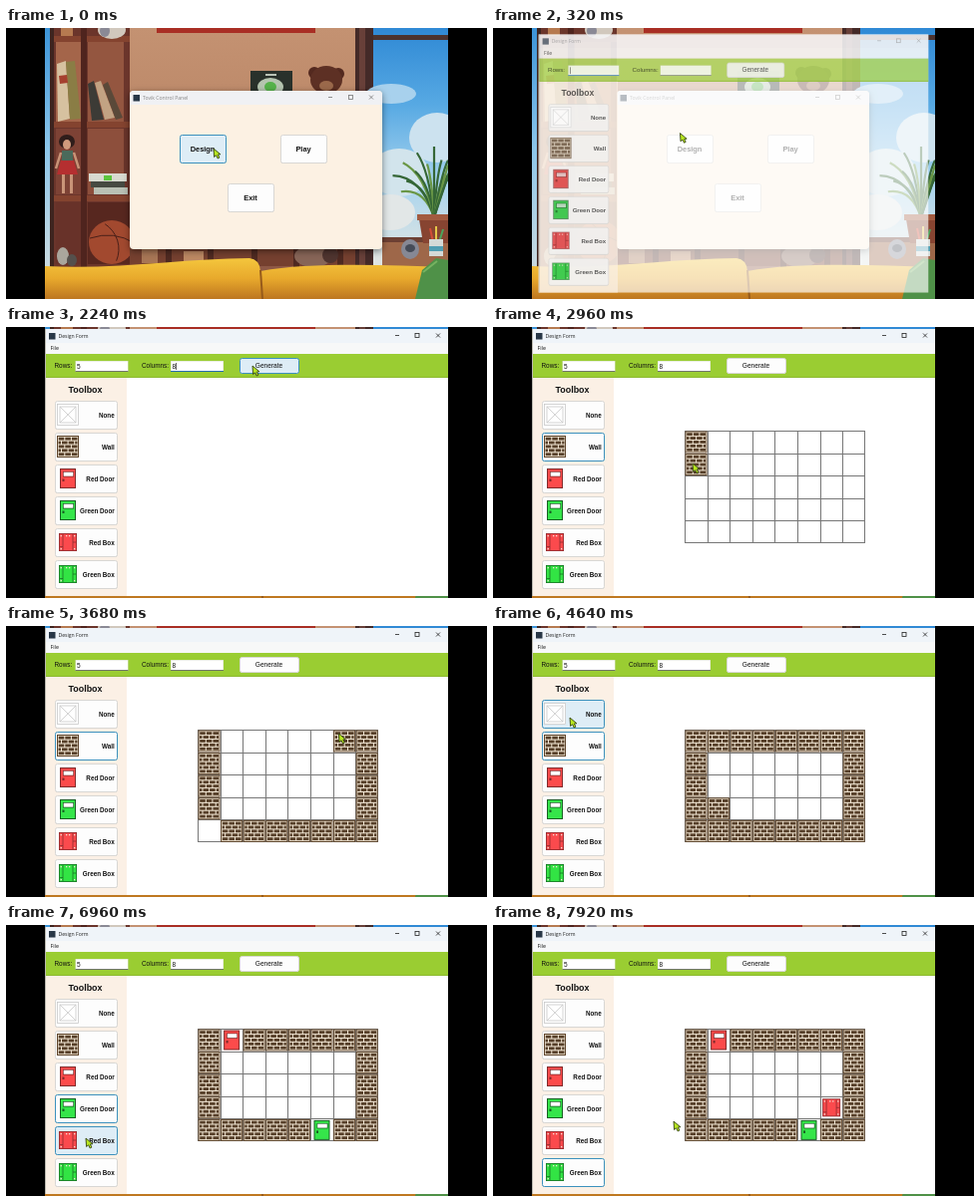
An HTML page with a canvas that plays this animation: 482 px wide and 272 px high, repeating every 8000 ms.

```html
<!DOCTYPE html>
<html lang="en">
<head>
<meta charset="utf-8">
<title>Design Form</title>
<style>
html, body { margin: 0; width: 100%; height: 100%; overflow: hidden; background: #000; }
canvas { display: block; width: 482px; height: 272px; }
</style>
</head>
<body>
<canvas id="stage" width="482" height="272"></canvas>
<script>
const ctx = document.getElementById('stage').getContext('2d');
const LOOP = 8000, STEP = 80, OPEN = 240;
const ARIAL = '"Liberation Sans", Arial, sans-serif';
const UI = '"Open Sans", "Noto Sans", sans-serif';

function rect(x, y, w, h, fill) {
  ctx.fillStyle = fill;
  ctx.fillRect(x, y, w, h);
}
function round(x, y, w, h, r, fill, stroke) {
  ctx.beginPath();
  ctx.roundRect(x, y, w, h, r);
  if (fill) { ctx.fillStyle = fill; ctx.fill(); }
  if (stroke) { ctx.strokeStyle = stroke; ctx.lineWidth = 1; ctx.stroke(); }
}
function oval(x, y, rx, ry, fill) {
  ctx.beginPath();
  ctx.ellipse(x, y, rx, ry, 0, 0, Math.PI * 2);
  ctx.fillStyle = fill;
  ctx.fill();
}
function poly(fill, ...p) {
  ctx.beginPath();
  for (let i = 0; i < p.length; i += 2) ctx.lineTo(p[i], p[i + 1]);
  ctx.closePath();
  ctx.fillStyle = fill;
  ctx.fill();
}
function line(color, width, ...p) {
  ctx.beginPath();
  for (let i = 0; i < p.length; i += 4) {
    ctx.moveTo(p[i], p[i + 1]);
    ctx.lineTo(p[i + 2], p[i + 3]);
  }
  ctx.strokeStyle = color;
  ctx.lineWidth = width;
  ctx.stroke();
}
function text(s, x, y, font, color = '#111', align = 'left') {
  ctx.font = font;
  ctx.fillStyle = color;
  ctx.textAlign = align;
  ctx.fillText(s, x, y);
}
function gradient(y0, y1, ...colors) {
  const g = ctx.createLinearGradient(0, y0, 0, y1);
  colors.forEach((c, i) => g.addColorStop(i / (colors.length - 1), c));
  return g;
}

// Desktop wallpaper
function room() {
  rect(39, 0, 404, 272, gradient(0, 240, '#c49272', '#b98565', '#8d5846'));
  rect(151, 0, 159, 5, '#a92e24');

  // shelf
  rect(46, 0, 78, 240, '#6b352b');
  rect(50, 12, 26, 82, '#a4654a');
  rect(82, 12, 36, 82, '#945640');
  rect(50, 101, 26, 66, '#7d4235');
  rect(82, 101, 36, 66, '#8d4f3c');
  rect(50, 175, 26, 62, '#683229');
  rect(82, 175, 46, 62, '#57271f');
  for (const y of [8, 94, 168]) rect(46, y, 78, 6, '#84432f');
  rect(75, 0, 6, 240, '#4f241e');
  rect(39, 0, 6, 240, gradient(0, 240, '#3c94d8', '#8cc6ea', '#c9dae0'));
  rect(44, 0, 4, 240, '#3e241f');

  rect(55, 0, 12, 8, '#b67a50');
  oval(106, 2, 14, 9, '#d1c8bd');
  oval(99, 3, 5, 6, '#8a8995');
  poly('#d6c1a0', 51, 36, 60, 33, 64, 91, 52, 94);
  poly('#8a7d45', 60, 34, 69, 33, 75, 91, 64, 92);
  poly('#a5402f', 53, 48, 61, 47, 62, 55, 54, 56);
  poly('#3c3b36', 82, 56, 88, 53, 98, 92, 86, 93);
  poly('#c2a383', 89, 55, 95, 53, 109, 90, 99, 92);
  poly('#5a4939', 97, 57, 102, 54, 117, 90, 110, 92);

  // doll
  oval(61, 114, 8, 7, '#2f1d1b');
  oval(61, 117, 4, 5, '#cf9a7c');
  rect(56, 123, 11, 12, '#4a6a5b');
  poly('#b52f30', 55, 133, 68, 133, 72, 147, 51, 147);
  rect(56, 147, 3, 19, '#c99478');
  rect(64, 147, 3, 19, '#c99478');
  line('#c99478', 2.5, 55, 125, 50, 141, 68, 125, 73, 141);

  rect(83, 146, 38, 8, '#d8dad0');
  rect(85, 154, 34, 6, '#464a42');
  rect(88, 160, 34, 7, '#b9c0b4');
  rect(98, 148, 8, 5, '#5cc53e');

  oval(106, 215, 23, 22, '#a2492f');
  ctx.beginPath();
  ctx.arc(83, 222, 30, -1, 0.4);
  ctx.moveTo(84, 211);
  ctx.quadraticCurveTo(108, 203, 129, 216);
  ctx.strokeStyle = '#4a2019';
  ctx.lineWidth = 1;
  ctx.stroke();
  oval(57, 229, 6, 9, '#aaa69c');
  oval(66, 233, 5, 6, '#55504c');

  // middle items
  rect(124, 219, 230, 20, '#75402f');
  for (const x of [160, 202, 246, 288, 332]) rect(x, 210, 6, 30, '#4e2921');
  rect(136, 222, 16, 14, '#a87655');
  rect(178, 224, 20, 12, '#bc8863');
  oval(308, 229, 19, 11, '#876557');
  oval(325, 228, 8, 8, '#4f342f');
  rect(245, 43, 42, 24, '#29312b');
  oval(265, 59, 13, 9, '#b5c5b0');
  oval(265, 59, 6, 5, '#55b24a');
  rect(260, 46, 11, 2, '#b9c2b6');
  oval(309, 45, 6, 6, '#53291f');
  oval(333, 46, 6, 6, '#53291f');
  oval(321, 52, 16, 14, '#5d3024');
  oval(321, 58, 7, 5, '#9b694b');

  // window
  rect(350, 0, 93, 240, '#442a28');
  rect(368, 0, 75, 240, gradient(0, 230, '#2f89d5', '#57a9e3', '#a6d3ee', '#dfe5e3'));
  rect(354, 0, 6, 240, '#684039');
  rect(368, 7, 75, 5, '#4c332f');
  oval(386, 66, 25, 10, '#a8d1ed');
  oval(432, 110, 28, 25, '#cce2ef');
  oval(394, 145, 29, 24, '#d2e4ec');
  oval(385, 185, 25, 18, '#e2e7e7');
  rect(377, 214, 66, 26, '#9e6749');
  rect(368, 210, 75, 5, '#6d4033');

  // plant
  for (let i = 0; i < 15; i++) {
    const a = -Math.PI / 2 + (i - 7) * 0.13;
    const len = 42 + (i * 17) % 30;
    ctx.beginPath();
    ctx.moveTo(429, 190);
    ctx.quadraticCurveTo(429 + Math.cos(a) * len * 0.3, 190 - len * 0.7,
      Math.min(443, 429 + Math.cos(a) * len), 190 + Math.sin(a) * len);
    ctx.strokeStyle = i % 3 ? '#356636' : '#6a9746';
    ctx.lineWidth = 2.2;
    ctx.stroke();
  }
  poly('#874431', 414, 192, 443, 192, 443, 216, 418, 216);
  rect(412, 187, 31, 6, '#a25b40');
  oval(405, 222, 9, 10, '#868895');
  oval(405, 221, 5, 4, '#454b58');
  line('#d34c36', 2, 428, 215, 425, 201);
  line('#e5c748', 2, 431, 215, 431, 199);
  line('#4ca45c', 2, 434, 215, 438, 202);
  rect(424, 212, 14, 17, '#d5dad7');
  rect(424, 219, 14, 5, '#519eb2');

  // sofa
  ctx.beginPath();
  ctx.moveTo(39, 239);
  ctx.bezierCurveTo(110, 243, 180, 231, 244, 231);
  ctx.quadraticCurveTo(254, 232, 255, 244);
  ctx.bezierCurveTo(305, 235, 380, 238, 443, 240);
  ctx.lineTo(443, 272);
  ctx.lineTo(39, 272);
  ctx.fillStyle = gradient(231, 272, '#f4c63d', '#e8a92c', '#bd7620');
  ctx.fill();
  line('#965a1b', 2, 255, 243, 257, 272);
  poly('#4f9148', 410, 272, 417, 243, 431, 231, 443, 233, 443, 272);
  line('#76b361', 2, 418, 245, 432, 234);
}

function caption(x, y, title, color) {
  rect(x, y - 3, 6.5, 6.5, '#283747');
  text(title, x + 9.5, y + 2, '5.1px ' + UI, color);
}
function windowButtons(xs, y, color) {
  const [a, b, c] = xs;
  line(color, 0.8, a - 2, y, a + 2, y, c - 2, y - 2, c + 2, y + 2, c - 2, y + 2, c + 2, y - 2);
  ctx.strokeRect(b - 2, y - 2, 4, 4);
}
function button(x, y, w, h, hot, focus) {
  round(x + 0.5, y + 1, w - 1, h - 1, 2, '#d2cfca');
  round(x + 0.5, y + 0.5, w - 1, h - 1, 2, hot ? '#deedf6' : '#fdfdfd',
    hot || focus ? '#3c91bd' : '#d8d7d4');
}
function inside(p, x, y, w, h) {
  return p.x >= x && p.x < x + w && p.y >= y && p.y < y + h;
}

function controlPanel(p) {
  ctx.save();
  ctx.shadowColor = 'rgba(0,0,0,.45)';
  ctx.shadowBlur = 7;
  ctx.shadowOffsetY = 2;
  round(124, 63, 253, 159, 4, '#fcf1e3');
  ctx.restore();
  round(124, 63, 253, 14, [4, 4, 0, 0], '#f0f1f4');
  caption(127.5, 70, 'Tovik Control Panel', '#858585');
  windowButtons([325, 345.5, 366], 69.5, '#777');
  for (const [label, x, y] of [['Design', 174, 107], ['Play', 275, 107], ['Exit', 222, 156]]) {
    button(x, y, 47, 29, inside(p, x, y, 47, 29));
    text(label, x + 23, y + 17, 'bold 7.4px ' + ARIAL, '#111', 'center');
  }
}

// Tile pictures, each in a 22 px square
function wall(x, y) {
  rect(x, y, 22, 22, '#60462c');
  rect(x + 1, y + 1, 20, 20, '#f5ead8');
  for (let r = 0; r < 5; r++) {
    for (let k = -1; k < 4; k++) {
      const a = Math.max(1.5, k * 6.6 + (r % 2 ? 5 : 1.7));
      const b = Math.min(20.5, k * 6.6 + (r % 2 ? 10.6 : 7.3));
      if (b > a) rect(x + a, y + 1.7 + r * 3.9, b - a, 2.9, '#57402a');
    }
  }
}
function door(x, y, fill, dark) {
  rect(x + 3, y + 1, 16, 20, dark);
  rect(x + 4, y + 2, 14, 18, fill);
  rect(x + 6, y + 4, 11, 5.5, dark);
  rect(x + 6.7, y + 4.7, 9.6, 4, '#fff');
  rect(x + 5.5, y + 11.5, 2, 2.5, dark);
}
function box(x, y, fill, dark) {
  rect(x + 2, y + 2, 18, 18, dark);
  rect(x + 2.8, y + 2.8, 16.4, 16.4, fill);
  line(dark, 0.8, x + 6, y + 3, x + 6, y + 19, x + 16, y + 3, x + 16, y + 19,
    x + 3, y + 15.5, x + 6, y + 15.5, x + 16, y + 11, x + 19, y + 11);
  for (const [a, b] of [[3.6, 4], [17, 4], [17, 17], [3.6, 17], [9, 4], [12, 4]])
    rect(x + a, y + b, 1.3, 1.3, '#f3dfd5');
}
function none(x, y) {
  rect(x, y, 22, 22, '#fff');
  line('#c9c9c9', 0.8, x + 3, y + 3, x + 19, y + 19, x + 19, y + 3, x + 3, y + 19);
  ctx.strokeRect(x + 0.5, y + 0.5, 21, 21);
  ctx.strokeRect(x + 3, y + 3, 16, 16);
}
const TOOLS = [
  ['None', none],
  ['Wall', wall],
  ['Red Door', (x, y) => door(x, y, '#fc4b4b', '#812b2b')],
  ['Green Door', (x, y) => door(x, y, '#35e54a', '#175f22')],
  ['Red Box', (x, y) => box(x, y, '#fb4a4d', '#8c2b2e')],
  ['Green Box', (x, y) => box(x, y, '#32e444', '#187025')]
];

const GRID = { x: 192, y: 104, size: 22.6, cols: 8, rows: 5 };
const cellSpot = (c, r) => [GRID.x + c * GRID.size + 8, GRID.y + r * GRID.size + 4];

// Edits on the board: [time, column, row, tool]
const edits = [];
const stroke = (c, r) => edits.push([2890 + edits.length * 52, c, r, 1]);
for (let r = 0; r < 4; r++) stroke(0, r);
for (let c = 1; c < 8; c++) stroke(c, 4);
for (let r = 3; r >= 0; r--) stroke(7, r);
for (let c = 6; c > 0; c--) stroke(c, 0);
edits.push([4060, 0, 4, 1], [4200, 1, 3, 1], [5040, 1, 3, 0],
  [5640, 1, 0, 2], [6640, 5, 4, 3], [7320, 6, 3, 4]);

// Tool clicks: [time, tool]
const picks = [[2700, 1], [4700, 0], [5360, 2], [6290, 3], [7000, 4], [7680, 5]];

const path = [
  [0, 208, 121], [240, 208, 121], [520, 95, 38], [1150, 95, 38], [1400, 190, 38],
  [1900, 200, 38], [2200, 247, 39], [2360, 247, 39], [2640, 80, 118], [2720, 80, 118],
  ...edits.map(([t, c, r]) => [t, ...cellSpot(c, r)]),
  [4600, 77, 92], [4740, 77, 92], [5330, 80, 150], [5400, 80, 150],
  [5980, 75, 248], [6030, 75, 248], [6240, 80, 182], [6320, 80, 182],
  [6960, 80, 214], [7040, 80, 214], [7620, 78, 246], [7700, 78, 246],
  [7920, 181, 197], [8000, 183, 195]
].sort((a, b) => a[0] - b[0]);

function pointer(t) {
  const i = Math.max(1, path.findIndex(k => k[0] > t));
  const [t0, x0, y0] = path[i - 1], [t1, x1, y1] = path[i];
  const u = (t - t0) / (t1 - t0), e = u * u * (3 - 2 * u);
  return { x: x0 + (x1 - x0) * e, y: y0 + (y1 - y0) * e };
}

function field(x, value, focus) {
  rect(x, 34, 53, 11, '#d8dfc8');
  rect(x + 0.5, 34.5, 52, 10, '#fff');
  rect(x, 44, 53, 1, focus ? '#256bb5' : '#71766a');
  text(value, x + 1.5, 41.7, '6.5px ' + ARIAL);
  if (focus) rect(x + (value ? 5.2 : 2), 36, 0.7, 7, '#222');
}

function board(t) {
  const { x, y, size, cols, rows } = GRID;
  rect(x, y, cols * size, rows * size, '#fff');
  for (let c = 0; c <= cols; c++)
    rect(Math.round(x + c * size) - (c === cols ? 1 : 0), y, 1, rows * size, '#777');
  for (let r = 0; r <= rows; r++)
    rect(x, Math.round(y + r * size) - (r === rows ? 1 : 0), cols * size, 1, '#777');
  const cells = new Map();
  for (const [at, c, r, tool] of edits) if (at <= t) cells.set(c + r * cols, tool);
  for (const [i, tool] of cells) {
    if (!tool) continue;
    const px = x + (i % cols) * size, py = y + Math.floor(i / cols) * size;
    TOOLS[tool][1](px + 0.5, py + 0.5);
  }
}

function designForm(t, p) {
  const ready = t >= 640;
  rect(39, 2, 404, 268, '#fff');
  rect(39, 2, 404, 14, ready ? '#eff4f9' : '#f3f3f5');
  caption(43, 9, 'Design Form', ready ? '#222' : '#888');
  windowButtons([392, 412, 433], 8.5, ready ? '#222' : '#999');
  rect(39, 16, 404, 11, '#f7f8f8');
  text('File', 44.5, 23, '5.3px ' + UI);

  rect(39, 27, 404, 24, '#9acd32');
  rect(39, 50, 404, 1, '#8cb92f');
  text('Rows:', 48.5, 41.2, '6.4px ' + ARIAL);
  field(69.5, t >= 1000 ? '5' : '', t < 1400);
  text('Columns:', 136, 41.2, '6.4px ' + ARIAL);
  field(165, t >= 1680 ? '8' : '', t >= 1400 && t < 2360);
  button(234, 31, 60, 16, inside(p, 234, 31, 60, 16), t >= 2360 && t < 2700);
  text('Generate', 263.5, 41.3, '6.6px ' + ARIAL, '#111', 'center');

  rect(39, 51, 82, 219, '#fbf0e5');
  text('Toolbox', 79.5, 66, 'bold 8.9px ' + ARIAL, '#111', 'center');
  const pick = picks.filter(k => k[0] <= t).pop();
  TOOLS.forEach(([label, draw], i) => {
    const y = Math.round(73.5 + i * 32.1);
    button(49, y, 63, 29, inside(p, 49, y, 63, 29), pick && pick[1] === i);
    draw(51, y + 3);
    text(label, 108.7, y + 16.8, 'bold 6.3px ' + ARIAL, '#111', 'right');
  });

  if (t >= 2360) board(t);
  rect(39, 2, 1, 268, '#b9b7ad');
}

function cursor({ x, y }) {
  ctx.save();
  ctx.translate(x, y);
  ctx.lineJoin = 'round';
  poly('#b7e51f', 0, 0, 0.6, 8.5, 2.6, 6.8, 4.2, 10, 5.9, 9.1, 4.4, 6, 6.9, 5.8);
  ctx.strokeStyle = '#344313';
  ctx.lineWidth = 0.9;
  ctx.stroke();
  ctx.restore();
}

function draw(t) {
  const p = pointer(t);
  rect(0, 0, 482, 272, '#000');
  ctx.save();
  ctx.beginPath();
  ctx.rect(39, 0, 404, 272);
  ctx.clip();
  room();
  if (t < OPEN + 160) controlPanel(p);
  if (t >= OPEN) {
    const u = Math.min(1, (t - OPEN + STEP) / 240), s = 0.9 + 0.1 * u;
    ctx.globalAlpha = u;
    ctx.translate(241, 136);
    ctx.scale(s, s);
    ctx.translate(-241, -136);
    designForm(t, p);
    ctx.globalAlpha = 1;
  }
  const typing = t >= OPEN && (inside(p, 69, 34, 54, 11) || inside(p, 165, 34, 53, 11));
  if (!typing) cursor(p);
  ctx.restore();
}

const start = performance.now();
function tick() {
  const t = (performance.now() - start) % LOOP;
  draw(Math.floor(t / STEP) * STEP);
  requestAnimationFrame(tick);
}
tick();
</script>
</body>
</html>
```
